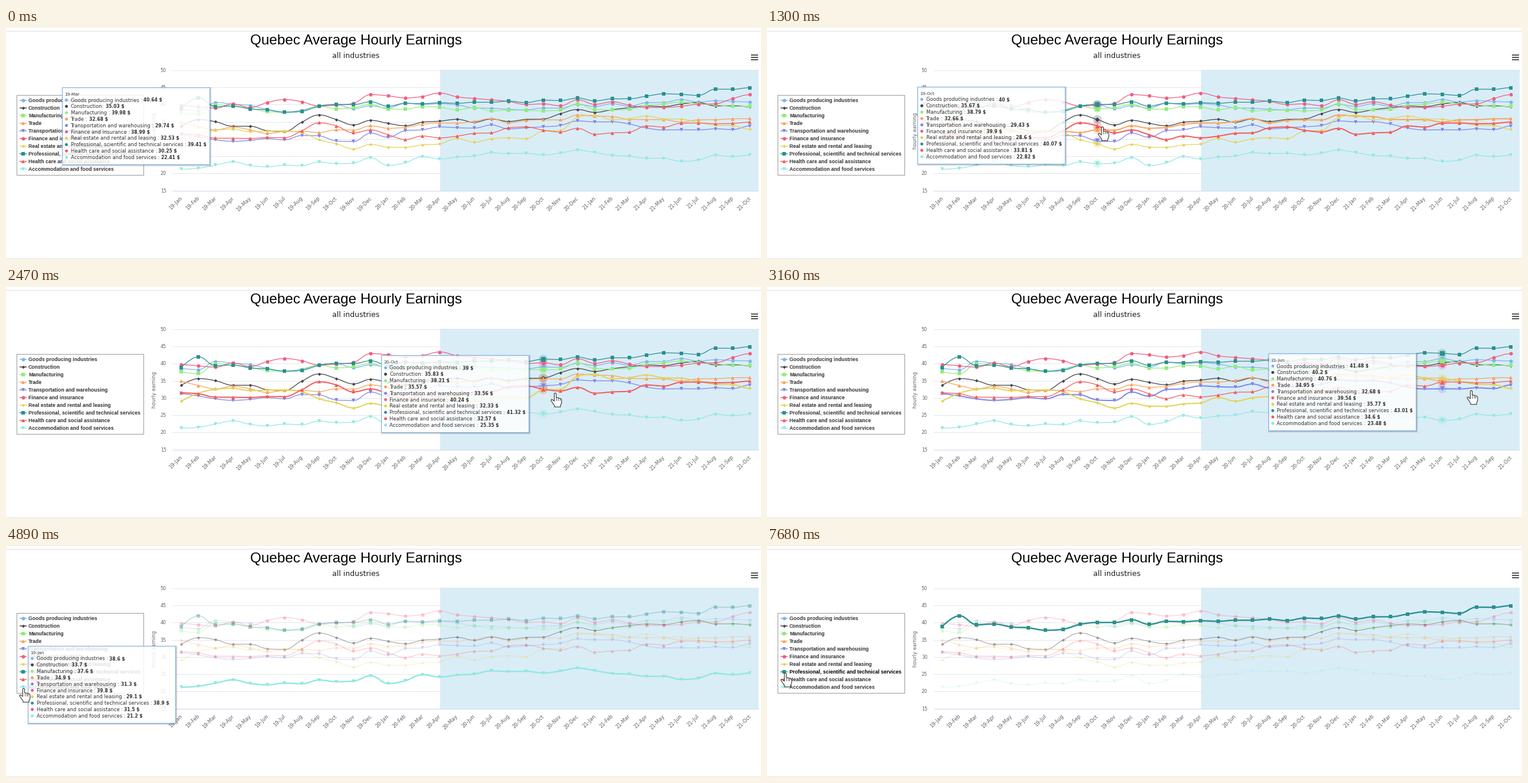
Recreate the animation shown at these times as a matplotlib script. Size 1280x393 px, loop 8 s.

```python
import numpy as np
import matplotlib.pyplot as plt
from matplotlib.animation import FuncAnimation
from matplotlib.colors import to_rgb
from matplotlib.patches import PathPatch, Polygon, Rectangle
from matplotlib.path import Path

W, H, DPI = 1280, 393, 100
PX = 72 / DPI
LOOP, STEP, TICK = 8000, 50, 10
LEFT, RIGHT, TOP, BOTTOM = 282, 1276, 72, 276.5
X0, DX, UNIT = 297, 29.227, 5.843
SANS, ARIAL = "DejaVu Sans", "Liberation Sans"

fig = plt.figure(figsize=(W / DPI, H / DPI), dpi=DPI, facecolor="white")
ax = fig.add_axes([0, 0, 1, 1])
ax.set_xlim(0, W)
ax.set_ylim(H, 0)
ax.axis("off")

MONTHS = "Jan Feb Mar Apr May Jun Jul Aug Sep Oct Nov Dec".split()
INDEX = np.arange(34)
DATES = [f"{19 + i // 12}-{MONTHS[i % 12]}" for i in INDEX]
rng = np.random.default_rng(5)


def px(i):
    return X0 + DX * i


def py(value):
    return TOP + (50 - value) * UNIT


def text(x, y, s, size, color="#333333", font=SANS, **kw):
    return ax.text(x, y, s, fontsize=size * PX, color=color, family=font, **kw)


def rule(x1, x2, y, color, width=1.0, z=1):
    ax.plot([x1, x2], [y, y], color=color, lw=width * PX, zorder=z,
            solid_capstyle="butt")


def box(x, y, w, h, z, fc="none", ec="none", lw=0):
    return ax.add_patch(Rectangle((x, y), w, h, fc=fc, ec=ec, lw=lw * PX, zorder=z))


def tame(handle, other, y, neighbour):
    """Keep a handle between its point and the neighbour, mirror the other one."""
    kept = np.clip(handle, min(y, neighbour), max(y, neighbour))
    return (handle, other) if kept == handle else (kept, 2 * y - kept)


def spline(ys, k=1.5):
    """Smooth Bezier path whose handles never overshoot the neighbours."""
    reach = DX / (k + 1)
    pts, out = [(px(0), ys[0])], (px(0), ys[0])
    for i in range(1, len(ys)):
        x, y = px(i), ys[i]
        before, after = y, y
        if i < len(ys) - 1:
            slope = (ys[i + 1] - ys[i - 1]) / 2 / (k + 1)
            before, after = tame(y - slope, y + slope, y, ys[i - 1])
            after, before = tame(after, before, y, ys[i + 1])
        pts += [out, (x - reach, before), (x, y)]
        out = (x + reach, after)
    return Path(pts, [Path.MOVETO] + [Path.CURVE4] * (len(pts) - 1))


# ---- series: a few levels, joined with a monthly wobble and a December rise ----
KNOTS = [0, 1, 2, 6, 8, 10, 15, 20, 24, 29, 33]
MARKER_SIZE = {"o": 6, "D": 3.9, "s": 5.8, "^": 6.3, "v": 6.3}


def monthly(levels):
    wobble = rng.normal(0, 0.45, INDEX.size) + 1.1 * (INDEX % 12 == 11)
    wobble[KNOTS] = 0
    return np.round(np.interp(INDEX, KNOTS, levels) + wobble, 2)


class Series:
    def __init__(self, row, name, color, marker, *levels):
        self.name, self.color, self.marker = name, color, marker
        self.size = MARKER_SIZE[marker]
        self.values = monthly(levels)
        self.ys = py(self.values)
        self.dim = 0.55 - 0.4 * np.mean(to_rgb(color))
        z, y = 3 + 0.1 * row, 123 + 12.95 * row
        self.line = ax.add_patch(PathPatch(spline(self.ys), fc="none", ec=color, zorder=z))
        self.dots = self.mark(px(INDEX), self.ys, z + 0.05)
        rule(23, 34.5, y, color, 1.5, 6)
        self.mark([28.7], [y], 6)
        self.label = text(38, y + 3, name, 8.65, font=ARIAL, weight="bold", zorder=6)

    def mark(self, xs, ys, z, grow=0):
        return ax.plot(xs, ys, self.marker, color=self.color, mew=0,
                       ms=(self.size + grow) * PX, zorder=z)[0]

    def style(self, width, alpha):
        self.line.set_linewidth(width * PX)
        self.line.set_alpha(alpha)
        self.dots.set_alpha(alpha)


series = [Series(row, *spec) for row, spec in enumerate([
    ("Goods producing industries", "#7cb5ec", "o",
     38.6, 38.25, 40.64, 37.85, 39.7, 38.83, 40.3, 38.5, 39.5, 41.48, 40.8),
    ("Construction", "#434348", "D",
     33.7, 35.65, 35.03, 32.2, 37, 34.1, 35.21, 35.7, 37.75, 40.2, 39.4),
    ("Manufacturing", "#90ed7d", "s",
     37.6, 37.08, 39.98, 37.8, 39.6, 39.14, 39.26, 38.35, 38.6, 40.76, 39.5),
    ("Trade", "#f7a35c", "^",
     34.9, 33.64, 32.68, 32.2, 31.9, 32.61, 34.66, 35.4, 36.65, 34.95, 35.9),
    ("Transportation and warehousing", "#8085e9", "v",
     31.3, 30.6, 29.74, 29.75, 30.9, 29.28, 33.52, 33.25, 35, 32.68, 33.8),
    ("Finance and insurance", "#f15c80", "o",
     39.8, 39.37, 38.99, 41.5, 39.6, 40.4, 43.4, 40.05, 40.1, 39.54, 42.9),
    ("Real estate and rental and leasing", "#e4d354", "D",
     29.1, 31.41, 32.53, 32.35, 29.8, 27.11, 28.58, 30.1, 36.9, 35.77, 32.8),
    ("Professional, scientific and technical services", "#2b908f", "s",
     38.9, 42.02, 39.41, 37.8, 39.5, 40.05, 40.55, 40.6, 41.1, 43.01, 44.95),
    ("Health care and social assistance", "#f45b5b", "^",
     31.5, 31.23, 30.25, 30.4, 34.7, 31.78, 30.34, 33.5, 31.4, 34.6, 34.9),
    ("Accommodation and food services", "#91e8e1", "v",
     21.2, 21.5, 22.41, 22.4, 23.3, 22.99, 24.17, 25.85, 26.05, 23.48, 25.3),
])]
COLORS = [s.color for s in series]
COUNT = len(series)

# ---- fixed parts ----
rule(0, W, 4.5, "#dedede")
rule(0, W, 392.3, "#e4e4e4")
box(736, 71, RIGHT - 736, BOTTOM - 71, 0, fc="#d9edf7")
for v in range(15, 55, 5):
    rule(LEFT, RIGHT, py(v), "#ccd6eb" if v == 15 else "#e4e6e8")
    text(272, py(v) + 3, str(v), 8, "#666666", ha="right")
for i, date in enumerate(DATES):
    text(px(i) + 2, 290, date, 8.5, "#666666", ha="right", va="baseline",
         rotation=45, rotation_mode="anchor")
text(251, 175, "hourly earning", 8.5, "#666666", rotation=90, ha="center", va="center")
text(593, 27.7, "Quebec Average Hourly Earnings", 24.2, "#000000", ARIAL, ha="center")
text(593, 50.7, "all industries", 12.5, "#222222", ha="center")
for y in (45.5, 49.5, 53.5):
    rule(1263, 1274.5, y, "#555555", 2)
box(17.5, 113.5, 215, 136, 5, fc="white", ec="#999999", lw=1)

# ---- tooltip, halos ----
TIP_W, TIP_H, TIP_GAP = 250, 131, 261
shadows = [(box(0, 0, TIP_W, TIP_H, 10, ec="black", lw=w), a)
           for w, a in ((5, 0.05), (3, 0.08), (1, 0.12))]
panel = box(0, 0, TIP_W, TIP_H, 10.1, fc="white")
frame = box(0, 0, TIP_W, TIP_H, 10.2, ec="#7cb5ec", lw=1)
head = text(0, 0, "", 7.3, zorder=11)
names = [text(0, 0, s.name + (":" if s.name == "Construction" else " :"), 8.36, zorder=11)
         for s in series]
amounts = [text(0, 0, "", 7.7, weight="bold", zorder=11) for _ in series]
renderer = fig.canvas.get_renderer()
widths = [n.get_window_extent(renderer).width for n in names]


def dots(size, **kw):
    return ax.scatter(np.zeros(COUNT), np.zeros(COUNT), s=(size * PX) ** 2, c=COLORS,
                      lw=0, **kw)


bullets = dots(5, zorder=11)
halos = dots(15, alpha=0.24, zorder=2.9)
bigs = [s.mark([0], [0], 4.5, 1.5) for s in series]

# ---- pointer ----
HAND = 1.08 * np.array([
    (-1.5, 1), (0, 0), (1.5, 1), (1.5, 7), (4.5, 7.6), (7.3, 8.6), (9.4, 9.5), (10, 11),
    (10, 16), (8.3, 19.5), (8.3, 22), (-1, 22), (-1, 20), (-6.6, 12), (-6, 10.3),
    (-4.5, 10.5), (-1.5, 13)])
ARROW = np.array([(0, 0), (0, 17), (4, 13.5), (7, 20), (9.5, 19), (6.5, 12.5), (12, 12.5)])
pointer = ax.add_patch(Polygon(ARROW, closed=True, fc="white", ec="#222222",
                               lw=PX, joinstyle="round", zorder=20))
creases = [ax.plot([], [], color="#222222", lw=0.7 * PX, zorder=21)[0] for _ in range(3)]

# time, x, y of the pointer tip
ROUTE = np.array([
    (70, 345, 405), (600, 339, 195), (810, 337, 152), (1650, 715, 178), (1775, 729, 183),
    (3060, 1100, 178), (3175, 1194, 176), (3300, 1225, 176), (3790, 1115, 178),
    (4040, 1115, 178), (4050, 600, 229), (4130, 580, 229), (4175, 474, 229),
    (4820, 30, 242), (6195, 30, 242), (6200, 30, 238), (6250, 30, 238),
    (6470, 30, 227), (7330, 30, 227), (7670, 31, 216)])
LAG, HIDE, FADE = 40, 450, 400


def cursor(t):
    return [np.interp(t, ROUTE[:, 0], ROUTE[:, k]) for k in (1, 2)]


def in_plot(x, y):
    return LEFT <= x <= RIGHT and TOP <= y <= BOTTOM


def chase():
    """Tooltip state per frame: it closes a third of the gap every 32 ms."""
    idx, goal, seen = 2, 165.5, LOOP
    left, mid = px(idx) - TIP_GAP, goal
    rate = 1 - (2 / 3) ** (TICK / 32)
    states = []
    for t in range(0, LOOP, TICK):
        x, y = cursor(t - LAG)
        inside = in_plot(x, y)
        if inside:
            idx = int(np.clip(round((x - X0) / DX), 0, INDEX[-1]))
            goal, seen = y, t
        left += (px(idx) - TIP_GAP - left) * rate
        mid += (goal - mid) * rate
        if t % STEP == 2 * TICK:
            fade = np.clip(1 - (t - seen - HIDE) / FADE, 0, 1)
            states.append((idx, left, mid, fade, inside))
    return states


STATES = chase()


def legend_row(x, y):
    row = round((y - 123) / 12.95)
    return row if 17 < x < 190 and 0 <= row < COUNT else None


def distances(x, y):
    return [abs(np.interp(x, px(INDEX), s.ys) - y) for s in series]


def place_tooltip(idx, left, mid, fade):
    left, top = round(left) + 0.5, round(mid - TIP_H / 2) + 0.5
    for patch, a in shadows:
        patch.set_xy((left + 1, top + 1))
        patch.set_alpha(a * fade)
    for patch, a in ((panel, 0.85), (frame, 1)):
        patch.set_xy((left, top))
        patch.set_alpha(a * fade)
    head.set_text(DATES[idx])
    head.set_position((left + 5, top + 14.3))
    ys = top + 22 + 10.83 * np.arange(COUNT)
    for s, name, amount, width, y in zip(series, names, amounts, widths, ys):
        name.set_position((left + 15, y + 3))
        amount.set_text(f"{s.values[idx]:g} \\$")
        amount.set_position((left + 17.7 + width, y + 3))
    bullets.set_offsets(np.column_stack([np.full(COUNT, left + 8), ys]))
    for item in [head, bullets, *names, *amounts]:
        item.set_alpha(fade)
        item.set_visible(fade > 0)


def place_pointer(x, y, hand):
    pointer.set_xy((HAND if hand else ARROW) + (x, y))
    for k, line in enumerate(creases):
        line.set_visible(hand)
        cx = x + 1.6 + 2.9 * k
        line.set_data([cx, cx], [y + 8 + 0.8 * k, y + 12.5])


def update(n):
    t = n * STEP + STEP / 2
    idx, left, mid, fade, inside = STATES[n]
    x, y = cursor(t)
    active = legend_row(x, y)
    gaps = distances(x, y)
    hovered = np.argsort(gaps)[:2] if in_plot(x, y) else []
    for k, s in enumerate(series):
        if active is None:
            s.style(2.0 if k in hovered else 1.25, 1)
        else:
            s.style(2.4 if k == active else 1.2, 1 if k == active else s.dim)
        s.label.set_color("black" if k == active else "#333333")
    spots = [s.ys[idx] for s in series]
    halos.set_offsets(np.column_stack([np.full(COUNT, px(idx)), spots]))
    halos.set_visible(inside)
    for mark, spot in zip(bigs, spots):
        mark.set_data([px(idx)], [spot])
        mark.set_visible(inside)
    place_tooltip(idx, left, mid, fade)
    on_line = in_plot(x, y) and min(gaps) < 7
    place_pointer(x, y, active is not None or on_line)
    return []


anim = FuncAnimation(fig, update, frames=LOOP // STEP, interval=STEP,
                     init_func=lambda: update(0), repeat=True, repeat_delay=0,
                     blit=False)
plt.show()
```
